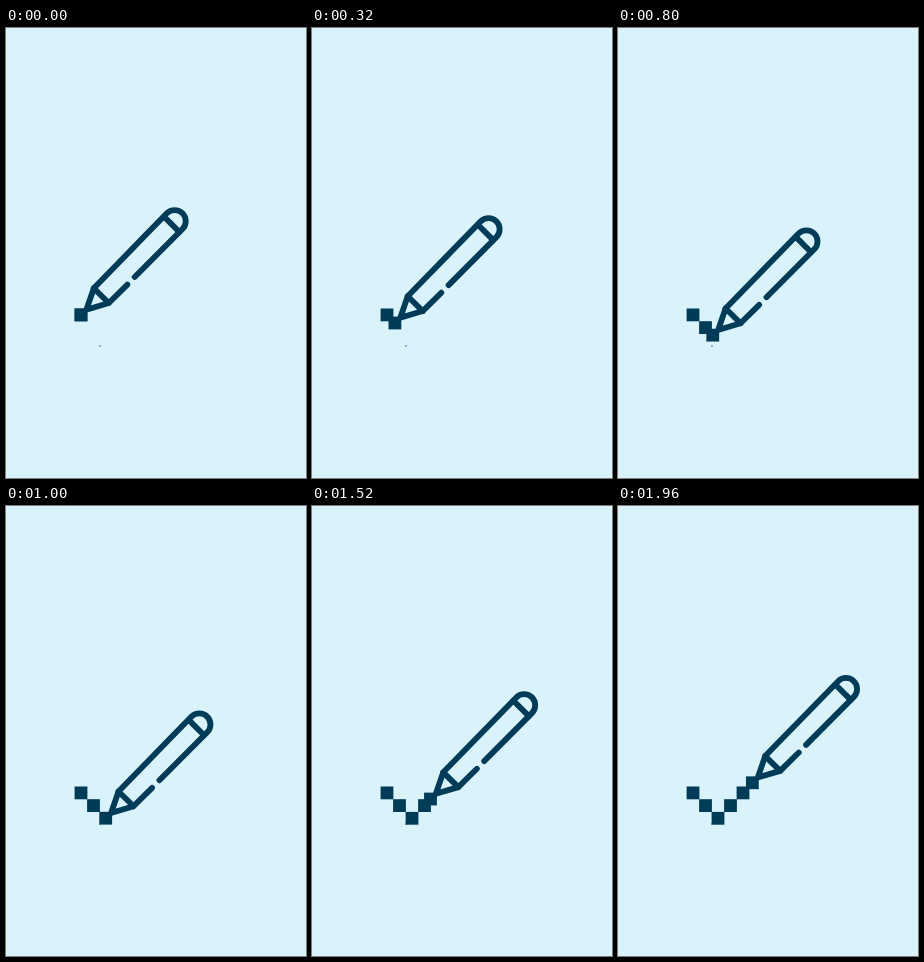
Recreate the animation shown at these times as an HTML page. Size 300x450 px, loop 2000 ms.

```html
<!DOCTYPE html>
<html lang="en">
<head>
<meta charset="utf-8">
<title>Pixel pencil</title>
<style>
  html, body { margin: 0; width: 100%; height: 100%; overflow: hidden; background: #daf3fb; }
  svg { display: block; }
  .ink { fill: #003c58; }
  .line { fill: none; stroke: #003c58; stroke-width: 5.8; stroke-linecap: round; stroke-linejoin: round; }
</style>
</head>
<body>
<svg width="300" height="450" viewBox="0 0 300 450">
  <rect class="ink" x="93.3" y="317.3" width="1.3" height="1.3" opacity=".8"/>
  <g id="trail" class="ink"></g>
  <g id="pen">
    <rect class="ink" x="68.6" y="280.5" width="12.8" height="12.8"/>
    <g class="line">
      <path d="M121.4 256.6L102.8 275L80.4 281.7L87.8 260.2L160.8 185.3A11.1 11.1 0 0 1 176.5 201L128.7 249"/>
      <path d="M87.8 260.2L102.8 275M158 188.6L173.4 204"/>
    </g>
  </g>
</svg>
<script>
const LOOP = 2000, STEP = 40, SIDE = 12.8;
const path = [[0, 0, 0], [1000, 24.7, 25.3], [2000, 60.8, -11.6]];
// time shown, column, row
const stamps = [[0, 0, 0], [520, 1, 1], [1160, 2, 2], [1360, 3, 1], [1720, 4, 0]];

const pen = document.getElementById('pen');
const trail = document.getElementById('trail');

const cells = stamps.map(([, col, row]) => {
  const cell = document.createElementNS('http://www.w3.org/2000/svg', 'rect');
  const attrs = { x: 68.6 + col * 12.5, y: 280.5 + row * 12.7, width: SIDE, height: SIDE };
  for (const name in attrs) cell.setAttribute(name, attrs[name]);
  trail.append(cell);
  return cell;
});

function offsetAt(t) {
  const i = t < path[1][0] ? 0 : 1;
  const [t0, x0, y0] = path[i], [t1, x1, y1] = path[i + 1];
  const k = (t - t0) / (t1 - t0);
  return [x0 + (x1 - x0) * k, y0 + (y1 - y0) * k];
}

function draw(now) {
  const t = Math.floor((now % LOOP) / STEP) * STEP;
  pen.setAttribute('transform', `translate(${offsetAt(t)})`);
  cells.forEach((cell, i) => cell.setAttribute('visibility', t >= stamps[i][0] ? 'visible' : 'hidden'));
}

const start = performance.now();
function tick() {
  draw(performance.now() - start);
  requestAnimationFrame(tick);
}
tick();
</script>
</body>
</html>
```
